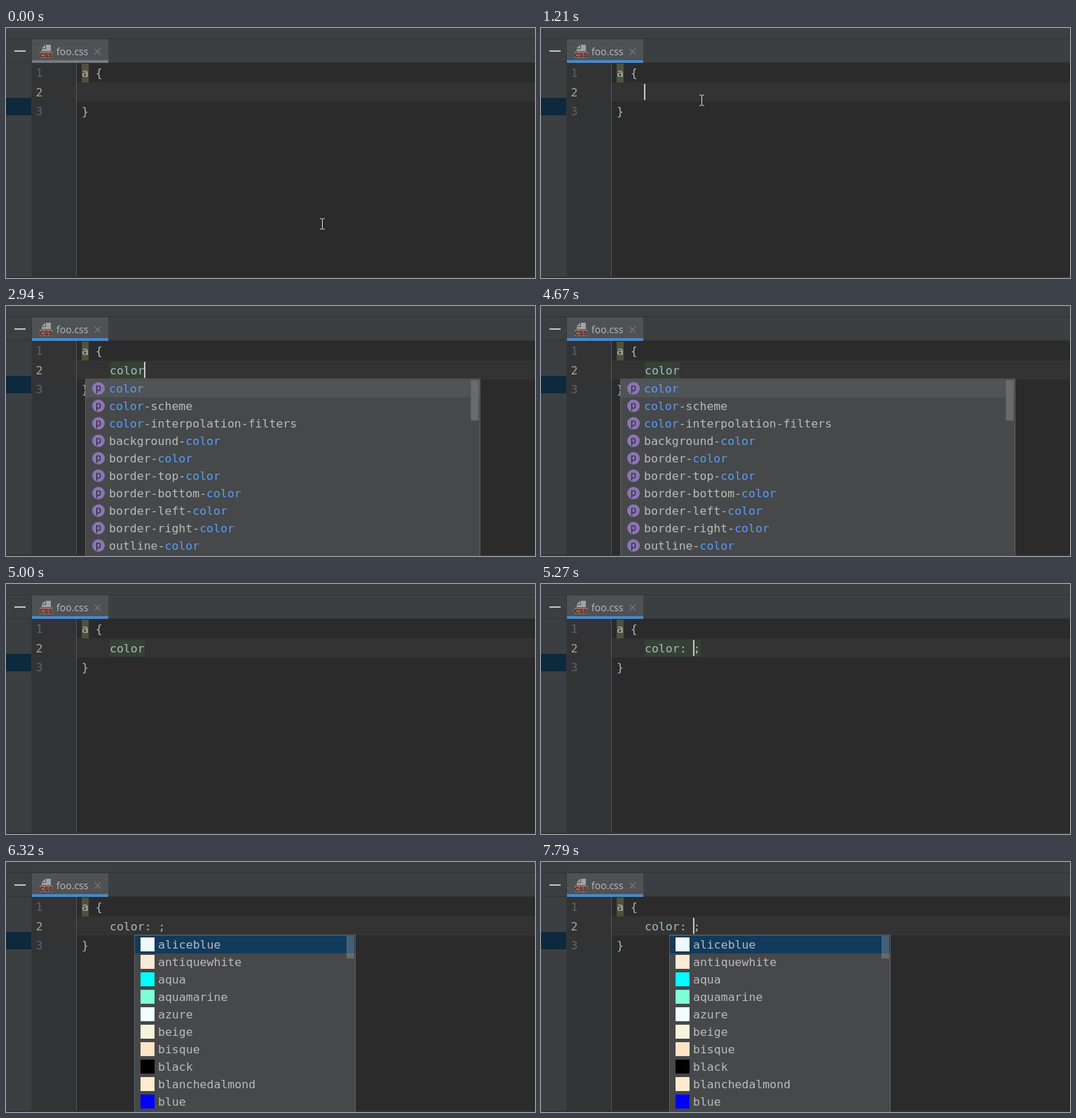
An HTML page for the animation above (8000 ms loop, 755x358 px).

```html
<!DOCTYPE html>
<html lang="en">
<head>
<meta charset="utf-8">
<title>Code completion</title>
<style>
  html, body { margin: 0; width: 100%; height: 100%; overflow: hidden; background: #2b2b2b; }
  svg { display: block; width: 755px; height: 358px; }
  text { white-space: pre; }
  .code { font: 16.5px "DejaVu Sans Mono", monospace; fill: #a9b7c6; }
  .num { fill: #606366; }
  .item { fill: #bbbbbb; }
  .match { fill: #589df6; }
  .ui { font: 14px "Open Sans", sans-serif; fill: #bbbbbb; }
</style>
</head>
<body>
<svg id="stage" viewBox="0 0 755 358" xmlns="http://www.w3.org/2000/svg"></svg>
<script>
const LOOP = 8000;
const stage = document.getElementById("stage");

function add(parent, tag, attrs, text) {
  const el = document.createElementNS("http://www.w3.org/2000/svg", tag);
  for (const key in attrs) el.setAttribute(key, attrs[key]);
  if (text !== undefined) el.textContent = text;
  parent.appendChild(el);
  return el;
}
const rect = (p, x, y, width, height, fill) => add(p, "rect", { x, y, width, height, fill });
const path = (p, d, attrs) => add(p, "path", { d, fill: "none", ...attrs });
const label = (p, x, y, cls, text) => add(p, "text", { x, y, class: cls }, text);
const show = (el, on) => el.setAttribute("visibility", on ? "visible" : "hidden");

// Window frame
rect(stage, 0, 0, 755, 358, "#3c3f41");
rect(stage, 0, 15, 755, 1, "#303234");
rect(stage, 0, 49, 755, 1, "#323232");
rect(stage, 0, 100, 36, 25, "#0d293e");
rect(stage, 36, 16, 1, 342, "#353739");
rect(stage, 12, 32, 16, 2, "#c3c5c6");

// Tab
rect(stage, 37, 16, 109, 30, "#4e5254");
const underline = rect(stage, 37, 46, 109, 4, "#747a80");
path(stage, "M57 24H64V33H51V30H57Z", { fill: "#9da3a7" });
path(stage, "M51 29L56 24V29Z", { fill: "#9da3a7" });
rect(stage, 48, 33.5, 18.5, 9.5, "#99695f");
add(stage, "text", {
  x: 57.2, y: 41.6, "text-anchor": "middle", fill: "#2f2423",
  style: "font: bold 9px 'Liberation Sans', sans-serif"
}, "CSS");
label(stage, 72, 38.5, "ui", "foo.css");
path(stage, "M126.5 29.5L135 38M135 29.5L126.5 38", { stroke: "#75797b", "stroke-width": 1.1 });

// Editor
rect(stage, 37, 50, 64, 308, "#313335");
rect(stage, 101, 50, 654, 308, "#2b2b2b");
rect(stage, 37, 78, 718, 27, "#323332");
rect(stage, 100, 50, 1, 308, "#555555");
rect(stage, 0, 356, 755, 2, "#323334");
rect(stage, 108, 51, 10, 27, "#52503a");
const highlight = rect(stage, 148, 80, 0, 24, "#354133");
[1, 2, 3].forEach(n => {
  const el = label(stage, 42.5, 42.5 + n * 27.5, "code num", n);
  if (n === 2) el.style.fill = "#a4a3a3";
});
label(stage, 108, 70, "code", "a {");
label(stage, 108, 125, "code", "}");
const typed = label(stage, 148, 98, "code", "");
const caret = rect(stage, 147, 80, 2, 23, "#c8c8c8");

function popup(x, width, rowFill) {
  const g = add(stage, "g", {});
  rect(g, x, 104, width, 256, "#5e6062");
  rect(g, x + 1, 105, width - 2, 255, "#46484a");
  rect(g, x + 1, 106, width - 2, 25, rowFill);
  return g;
}

// Property list
const props = popup(113, 564, "#505456");
["color", "color-scheme", "color-interpolation-filters", "background-color", "border-color",
 "border-top-color", "border-bottom-color", "border-left-color", "border-right-color",
 "outline-color"].forEach((name, i) => {
  const y = 118 + 25 * i;
  add(props, "circle", { cx: 132, cy: y, r: 9, fill: "#8b75b3" });
  add(props, "text", {
    x: 132, y: y + 4.2, "text-anchor": "middle", fill: "#292530",
    style: "font: 14px Roboto, sans-serif"
  }, "p");
  const line = label(props, 147, y + 6, "code item", "");
  name.split(/(color)/).forEach(part => {
    if (part) add(line, "tspan", part === "color" ? { class: "match" } : {}, part);
  });
});
rect(props, 663.5, 106, 11, 58, "#686a6c");

// Colour list
const colors = popup(183, 316, "#113a5c");
["aliceblue", "antiquewhite", "aqua", "aquamarine", "azure", "beige", "bisque", "black",
 "blanchedalmond", "blue"].forEach((name, i) => {
  const y = 108 + 25 * i;
  rect(colors, 192, y, 20, 20, name);
  label(colors, 217, y + 16, "code item", name);
});
rect(colors, 486, 106, 11, 32, "rgba(166,166,166,.35)");

// Mouse pointer
const pointer = add(stage, "g", {});
const click = add(pointer, "circle", { cx: -2.5, cy: -1, r: 15, fill: "#ffff00", "fill-opacity": .47 });
const beam = "M-3.5 -7.5H-.8L0 -6.7L.8 -7.5H3.5M0 -7V7M-3.5 7.5H-.8L0 6.7L.8 7.5H3.5";
path(pointer, beam, { stroke: "#1c1c1c", "stroke-width": 2, opacity: .5 });
path(pointer, beam, { stroke: "#e6e6e6", "stroke-width": 1 });

function pointerAt(t) {
  if (t < 70) return [451.5, 280.5];
  if (t < 110) return [414.5, 252.5];
  if (t < 260) return [379.5, 227.5];
  const k = Math.min(1, (Math.floor((t - 260) / 66.6) + 1) / 10);
  const e = 1 - (1 - k) ** 2;
  return [379.5 - 150 * e, 227.5 - 124 * e];
}

// Characters typed and characters highlighted; the highlight lags one step.
function typing(t) {
  if (t < 2080) return [0, 0];
  if (t < 5270) {
    const step = Math.min(8, Math.floor((t - 2080) / 83.75 + 1e-6));
    return [1 + Math.ceil(step / 2), 1 + Math.floor(step / 2)];
  }
  return [8, t < 5390 ? 8 : 0];
}

const caretOff = [[0, 1210], [3680, 4140], [4670, 5270], [6320, 6790], [7330, 7790]];

function draw(t) {
  const [count, lit] = typing(t);
  typed.textContent = "color: ;".slice(0, count);
  highlight.setAttribute("width", lit * 10);
  caret.setAttribute("x", 147 + 10 * Math.min(count, 7));
  show(caret, !caretOff.some(([from, to]) => t >= from && t < to));
  underline.setAttribute("fill", t < 1210 ? "#747a80" : "#4a88c7");

  pointer.setAttribute("transform", `translate(${pointerAt(t)})`);
  pointer.setAttribute("display", t < 2080 ? "inline" : "none");
  show(click, t >= 1060 && t < 1210);

  props.setAttribute("display", t >= 2940 && t < 5000 ? "inline" : "none");
  colors.setAttribute("display", t >= 5330 ? "inline" : "none");
}

const start = performance.now();
function tick() {
  draw((performance.now() - start) % LOOP);
  requestAnimationFrame(tick);
}
draw(0);
requestAnimationFrame(tick);
</script>
</body>
</html>
```
